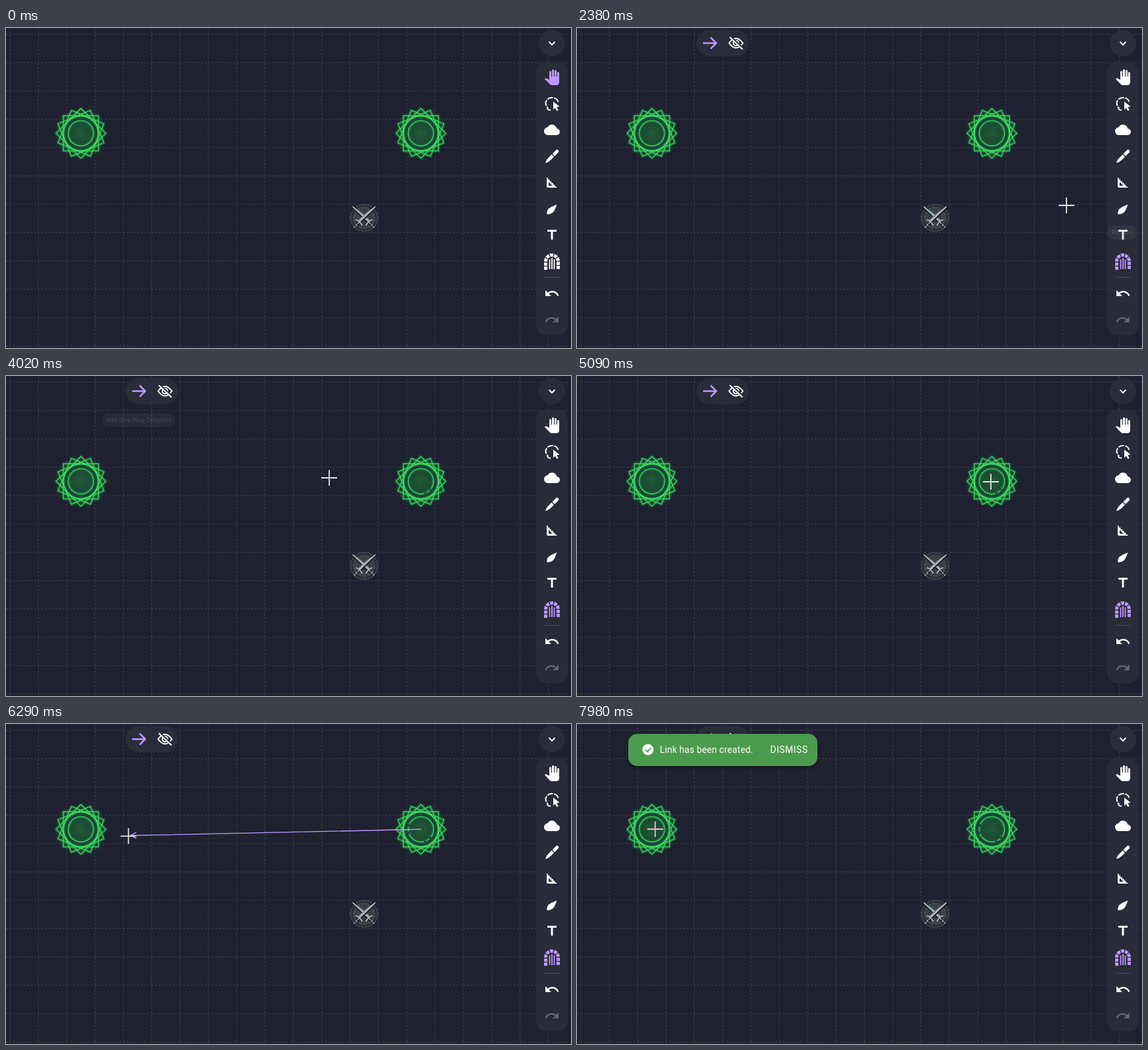
Write an HTML page that moves like this. It is 860 by 487 pixels and loops after 8 s.

```html
<!DOCTYPE html>
<html lang="en">
<head>
<meta charset="utf-8">
<title>Linking portals</title>
<style>
  html, body { margin: 0; width: 100%; height: 100%; overflow: hidden; background: #1f2130; }
  svg { display: block; width: 100vw; height: 100vh; }
  text { font-family: Roboto, sans-serif; fill: #fff; }
  .icon { fill: #fff; }
  .line { fill: none; stroke: #fff; stroke-width: 2; }
  .tip { font-size: 11px; letter-spacing: .42px; text-anchor: middle; }
  .purple { fill: #bb99ff; }
  .purple.line { fill: none; stroke: #bb99ff; }
  #arch { color: #fff; }
  #arch.on { color: #bb99ff; }
  #arch .line { stroke: currentColor; }
</style>
</head>
<body>
<svg viewBox="0 0 860 487" preserveAspectRatio="none">
  <defs>
    <radialGradient id="well">
      <stop offset="0" stop-color="#1f5c36"/>
      <stop offset="1" stop-color="#1c4534"/>
    </radialGradient>
    <filter id="glow" x="-30%" y="-30%" width="160%" height="160%">
      <feGaussianBlur stdDeviation="1.6"/>
    </filter>
    <filter id="shadow" x="-10%" y="-30%" width="120%" height="180%">
      <feDropShadow dx="0" dy="3" stdDeviation="3" flood-opacity=".4"/>
    </filter>
    <g id="star" fill="none">
      <rect id="square" x="-26.8" y="-26.8" width="53.6" height="53.6"/>
      <use href="#square" transform="rotate(22.5)"/>
      <use href="#square" transform="rotate(45)"/>
      <use href="#square" transform="rotate(67.5)"/>
      <circle r="26.3"/>
      <circle r="19.3"/>
    </g>
    <g id="portal">
      <circle r="26" fill="#1d3436"/>
      <circle r="19" fill="url(#well)"/>
      <use href="#star" stroke="#18b83f" stroke-width="2.4" opacity=".75" filter="url(#glow)"/>
      <use href="#star" stroke="#46e068" stroke-width="1.1"/>
    </g>
    <path id="undo" d="M12.5 8c-2.65 0-5.05.99-6.9 2.6L2 7v9h9l-3.62-3.62c1.39-1.16 3.16-1.88 5.12-1.88 3.54 0 6.55 2.31 7.6 5.5l2.37-.78C21.08 11.03 17.15 8 12.5 8z"/>
    <g id="sword" stroke-linecap="round">
      <path d="M-9 9L14-14" stroke="#22252b" stroke-width="5"/>
      <path d="M-7 6Q4-5 18-18Q3-9-9 4z" fill="#8f989f"/>
      <path d="M-6 5L17-17" stroke="#d5dcdf" stroke-width="1.2"/>
      <path d="M-12 3Q-7 4-3 11" fill="none" stroke="#c3cacd" stroke-width="1.6"/>
      <path d="M-8 7L-15 14" stroke="#a5acb1" stroke-width="1.8" stroke-dasharray="1.5 3"/>
    </g>
  </defs>

  <rect width="860" height="487" fill="#1f2130"/>
  <path id="grid" fill="none" stroke="#444652" stroke-dasharray="2.7 2.7"/>
  <use href="#portal" x="114" y="160.3"/>
  <use href="#portal" x="631.5" y="160.3"/>
  <g fill="none" stroke="#1c4534" stroke-width="2.4">
    <circle id="gapA" cx="631.5" cy="160.3" r="19.3" pathLength="360" stroke-dasharray="9 18 9 324" stroke-dashoffset="-38"/>
    <circle id="gapB" cx="631.5" cy="160.3" r="19.3" pathLength="360" stroke-dasharray="12 22 12 314" stroke-dashoffset="-158"/>
  </g>
  <path id="traceLeft" d="M130 160.5H152M138 154l7 12M145 154l-7 12" fill="none" stroke="#596471" stroke-opacity=".7" stroke-dasharray="4 1.5"/>
  <path id="traceRight" d="M594 161.5H620M605 156l-7 5 7 5" fill="none" stroke="#4c5666" stroke-opacity=".8" stroke-dasharray="4 1.5"/>

  <g transform="translate(545 289)">
    <circle r="20.5" fill="#2b2e35" stroke="#42464d" stroke-width="1.5"/>
    <circle r="16" fill="#3b3f46" stroke="#5d6269" stroke-dasharray="5 2"/>
    <use href="#sword" transform="scale(-1 1)"/>
    <use href="#sword"/>
    <path d="M-13-14L-4-5" stroke="#88b79b" stroke-width="1.3"/>
  </g>

  <circle cx="831" cy="23" r="20" fill="#2a2c39"/>
  <path class="line" d="M826.5 21l4.5 4.5 4.5-4.5"/>
  <rect x="807" y="51" width="48" height="417" rx="15" fill="#292b38"/>
  <circle id="archHover" cx="831" cy="355" r="20" fill="#393b46"/>
  <path id="hand" class="icon" transform="translate(819 63)" d="M23 5.5V20c0 2.2-1.8 4-4 4h-7.3c-1.08 0-2.1-.43-2.85-1.19L1 14.83s1.26-1.23 1.3-1.25c.22-.19.49-.29.79-.29.22 0 .42.06.6.16.04.01 4.31 2.46 4.31 2.46V4c0-.83.67-1.5 1.5-1.5S11 3.17 11 4v7h1V1.5c0-.83.67-1.5 1.5-1.5S15 .67 15 1.5V11h1V2.5c0-.83.67-1.5 1.5-1.5s1.5.67 1.5 1.5V11h1V5.5c0-.83.67-1.5 1.5-1.5s1.5.67 1.5 1.5z"/>
  <path class="line" d="M840.5 112.5a9.6 8.8 0 1 0-16 8.5q-1.5 3.5 4.5 4" stroke-dasharray="9 1.6"/>
  <path class="icon" d="M833 112l9.500 7.500-4.200.9 2.400 4.600-2.300 1.200-2.400-4.700-3 2.900z"/>
  <path class="icon" transform="translate(819 143)" d="M19.35 10.04C18.67 6.59 15.64 4 12 4 9.11 4 6.6 5.64 5.35 8.04 2.34 8.36 0 10.91 0 14c0 3.31 2.69 6 6 6h13c2.76 0 5-2.24 5-5 0-2.64-2.05-4.78-4.65-4.96z"/>
  <path class="icon" d="M831.5 191.500l6-6q1.500-1 3 .5t.5 3l-6 6zM830.500 192.500l3.500 3.500-5 5q-3 3-8 4.500 1-5 4.500-8z"/>
  <path class="icon" transform="translate(819 223)" d="M17.66 17.66l-1.06 1.06-.71-.71 1.06-1.06-1.94-1.94-1.06 1.06-.71-.71 1.06-1.06-1.94-1.94-1.06 1.06-.71-.71 1.06-1.06L9.7 9.7l-1.06 1.06-.71-.71 1.06-1.06-1.94-1.94-1.06 1.06-.71-.71 1.06-1.06L4 4v14c0 1.1.9 2 2 2h14l-2.34-2.34zM7 17v-5.76L12.76 17H7z"/>
  <path class="icon" d="M838.500 268.500Q836 276 833.500 279.500Q830.500 283.500 823.500 283.500Q822.500 277.500 826.500 274.500Q831 271.500 838.500 268.500z"/>
  <path class="icon" transform="translate(819 303)" d="M5 4v3h5.5v12h3V7H19V4z"/>
  <g id="arch">
    <path class="line" d="M821.5 368V355a9.500 9.500 0 0 1 19 0V368" style="stroke-width:5" stroke-dasharray="4.900 1.300"/>
    <path class="line" d="M827.500 352V367M831 350V367M834.500 352V367" style="stroke-width:1.800"/>
  </g>
  <path d="M819 379.5H843" stroke="#464853"/>
  <use href="#undo" class="icon" x="819" y="392"/>
  <use href="#undo" transform="translate(843 432) scale(-1 1)" fill="#62646e"/>

  <g id="pill">
    <rect x="182" y="3" width="80" height="40" rx="20" fill="#2a2c39"/>
    <circle id="arrowHover" cx="202" cy="23" r="20" fill="#323542"/>
    <path class="line purple" d="M192 23H212M203.5 14.5L212 23l-8.500 8.500" style="stroke-width:2.500"/>
    <path class="line" d="M231.500 23Q242 8.500 252.500 23Q242 37.500 231.500 23z"/>
    <circle class="line" cx="242" cy="23" r="4"/>
    <path d="M234 13L253.500 31" stroke="#2a2c39" stroke-width="2"/>
    <path class="line" d="M232.500 14L252 32.500"/>
  </g>

  <g id="archTip">
    <rect x="804" y="297" width="53" height="25" rx="12.5" fill="#616161" fill-opacity=".94"/>
    <text class="tip" x="830.5" y="312.5">Portals</text>
  </g>
  <g id="arrowTip">
    <rect x="136" y="57" width="131" height="25" rx="12.5" fill="#616161" fill-opacity=".92"/>
    <text class="tip" x="201.5" y="72.5">Add One-Way Teleport</text>
  </g>

  <path id="link" fill="none" stroke="#bb99ff" stroke-width="1.4"/>
  <g id="snack">
    <rect x="78" y="15" width="288" height="49" rx="14" fill="#4c9b50" filter="url(#shadow)"/>
    <circle cx="108" cy="39" r="8.5" fill="#fff"/>
    <path d="M104 39.2l3 3 5.500-5.800" fill="none" stroke="#4c9b50" stroke-width="1.8"/>
    <text x="126" y="44" font-size="14" letter-spacing=".1">Link has been created.</text>
    <text x="294" y="44" font-size="14" letter-spacing=".5">DISMISS</text>
  </g>

  <g id="cursor">
    <circle id="press" r="12.5" fill="#e6dc22" fill-opacity=".78"/>
    <path id="pointer" d="M-1.8 2Q0-1 1.8 2V8l6.500 1.500q2 .8 2 3V16l-2 5.500H.5L-5.500 13q-1-2.500 1-2.800l2.700 2z" fill="#fff" stroke="#16171d" stroke-width=".8"/>
    <path id="cross" d="M-12 0H12M0-12V12" stroke-width="1.8"/>
  </g>
</svg>
<script>
const LOOP = 8000, STEP = 70;
const $ = id => document.getElementById(id);
const clamp = v => Math.max(0, Math.min(1, v));
const ramp = (t, from, to) => clamp((t - from) / (to - from));
const during = (t, from, to) => t >= from && t < to;
const show = (id, on) => $(id).setAttribute('visibility', on ? 'visible' : 'hidden');

const spans = [[790, 1350], [1490, 1700], [2170, 3220], [3810, 4560], [5300, 6790], [7380, 7720]];

// time, x, y of the cursor's hot spot
const track = [
  [790, 662, 468], [930, 668, 270], [1070, 735, 137], [1210, 820, 255], [1350, 831, 363],
  [2100, 831, 363], [2170, 825, 356], [2380, 745, 270], [2520, 640, 178], [2730, 400, 70],
  [2940, 240, 30], [3080, 216, 22], [3220, 201, 15],
  [3740, 201, 15], [3810, 225, 40], [3880, 310, 80], [4020, 492, 155], [4160, 575, 168],
  [4350, 615, 167], [4560, 629, 161], [4630, 630, 161],
  [5230, 630, 161], [5300, 622, 162], [5580, 480, 179], [5720, 390, 188], [5860, 310, 190],
  [6080, 235, 178], [6430, 150, 165], [6790, 119, 160]
];

function snap(t) {
  const span = spans.find(([from, to]) => during(t, from, to));
  return span ? span[0] + Math.floor((t - span[0]) / STEP) * STEP : t;
}

function position(t) {
  const next = track.findIndex(p => p[0] > t);
  if (next < 0) return track[track.length - 1].slice(1);
  const b = track[next], a = track[Math.max(0, next - 1)];
  const k = a === b ? 0 : (t - a[0]) / (b[0] - a[0]);
  return [a[1] + (b[1] - a[1]) * k, a[2] + (b[2] - a[2]) * k];
}

function grow(id, amount, x, y) {
  const scale = 1 - .2 * (1 - amount) ** 1.6;
  $(id).setAttribute('opacity', amount);
  $(id).setAttribute('transform', `translate(${x} ${y}) scale(${scale}) translate(${-x} ${-y})`);
}

function drawLink(x, y) {
  const tipX = x + 3, tipY = y - .8;
  const angle = Math.atan2(160.3 - tipY, 631.5 - tipX);
  const barb = turn => `${tipX + 10 * Math.cos(angle + turn)} ${tipY + 10 * Math.sin(angle + turn)}`;
  $('link').setAttribute('d',
    `M631.5 160.3L${tipX} ${tipY}M${barb(-.48)}L${tipX} ${tipY}L${barb(.48)}`);
}

function drawGrid() {
  let d = '';
  for (let x = 6; x < 860; x += 43.13) d += `M${x} 0V487`;
  for (let y = 9.5; y < 487; y += 43.13) d += `M0 ${y}H860`;
  $('grid').setAttribute('d', d);
}

function render(now) {
  const t = snap(now % LOOP);
  const [x, y] = position(t);
  const picked = t >= 1560, visible = t >= 790;
  const onControl = x > 806 || (y < 43 && x < 262) || !picked;

  $('hand').classList.toggle('purple', !picked);
  $('arch').classList.toggle('on', picked);
  show('pill', picked);
  show('archHover', during(t, 1280, 2240));
  show('arrowHover', during(t, 2940, 3880));
  grow('archTip', ramp(t, 1180, 1340) * (1 - ramp(t, 2200, 2420)), 830.5, 322);
  grow('arrowTip', ramp(t, 2965, 3190) * (1 - ramp(t, 3835, 4055)), 201.5, 55);

  show('gapA', t >= 2590);
  show('gapB', t >= 5370);
  show('traceLeft', t >= 6500);
  show('traceRight', t >= 7380);
  show('link', during(t, 5300, 7380));
  drawLink(x, y);
  grow('snack', ramp(t, 7420, 7650), 222, 39.5);

  $('cursor').setAttribute('transform', `translate(${x} ${y})`);
  show('pointer', visible && onControl);
  show('cross', visible && !onControl);
  show('press', during(t, 1490, 1630) || during(t, 3420, 3550) || during(t, 4960, 5090));
  $('cross').setAttribute('stroke', t >= 7980 ? '#f4b3c6' : '#e9e6e2');
}

drawGrid();
const start = performance.now();
function tick() {
  render(performance.now() - start);
  requestAnimationFrame(tick);
}
tick();
</script>
</body>
</html>
```
